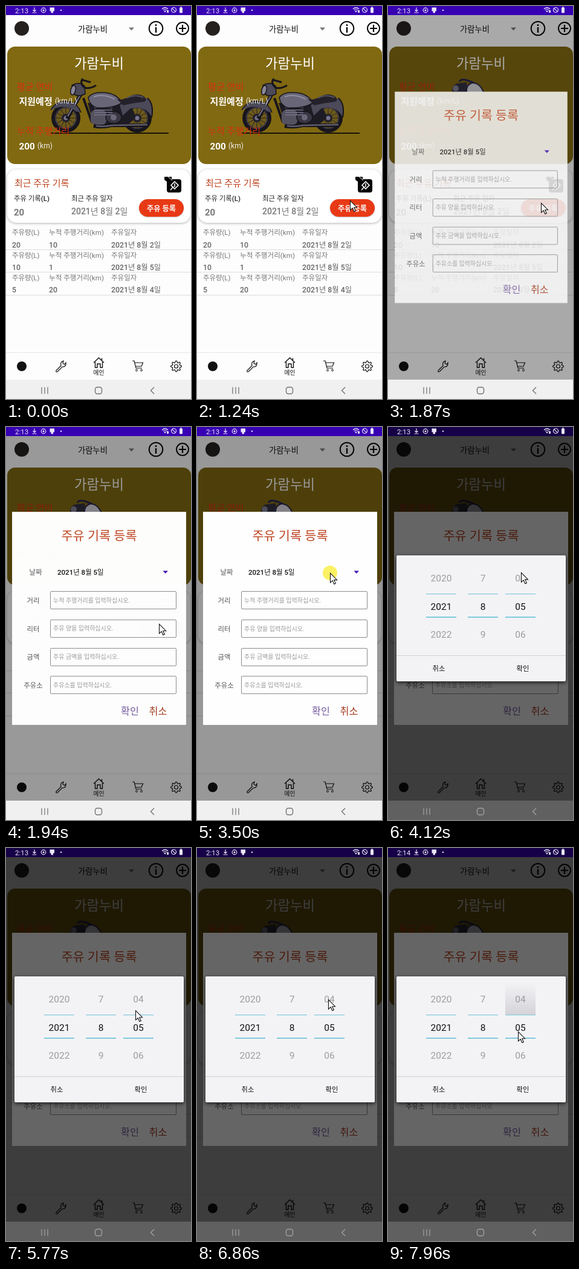
Animation, 306 px wide and 649 px high, one loop 8000 ms. Source, as an HTML page with a canvas:

```html
<!DOCTYPE html>
<html lang="ko">
<head>
<meta charset="utf-8">
<title>주유 기록</title>
<style>
html, body { margin: 0; width: 100%; height: 100%; overflow: hidden; background: #fdfdfd; }
canvas { display: block; width: 306px; height: 649px; }
</style>
</head>
<body>
<canvas id="stage"></canvas>
<script>
const W = 306, H = 649, LOOP = 8000;
const BIKE_NAME = '가람누비';
const FONT = 'Roboto, "Noto Sans CJK KR", "Noto Sans CJK", sans-serif';
const canvas = document.getElementById('stage');
const c = canvas.getContext('2d');
const dpr = window.devicePixelRatio || 1;
canvas.width = W * dpr;
canvas.height = H * dpr;

const clamp = v => Math.max(0, Math.min(1, v));
const ease = v => { v = clamp(v); return v * v * (3 - 2 * v); };
const ramp = (t, from, to) => ease((t - from) / (to - from));

function text(s, x, y, size, color, weight = 400, align = 'left') {
  c.font = `${weight} ${size}px ${FONT}`;
  c.textAlign = align;
  c.fillStyle = color;
  c.fillText(s, x, y + size * 0.37);
}
function rect(x, y, w, h, color) {
  c.fillStyle = color;
  c.fillRect(x, y, w, h);
}
function round(x, y, w, h, r, color) {
  c.beginPath();
  c.roundRect(x, y, w, h, r);
  c.fillStyle = color;
  c.fill();
}
function disc(x, y, r, color) {
  c.beginPath();
  c.arc(x, y, r, 0, 7);
  c.fillStyle = color;
  c.fill();
}
function ring(x, y, r, color, lw) {
  c.beginPath();
  c.arc(x, y, r, 0, 7);
  stroke(color, lw);
}
function stroke(color, lw) {
  c.strokeStyle = color;
  c.lineWidth = lw;
  c.stroke();
}
function path(d, color, lw) {
  const p = new Path2D(d);
  if (lw) {
    c.strokeStyle = color;
    c.lineWidth = lw;
    c.stroke(p);
  } else {
    c.fillStyle = color;
    c.fill(p);
  }
}
function shadow(color, blur, dy, draw) {
  c.save();
  c.shadowColor = color;
  c.shadowBlur = blur * dpr;
  c.shadowOffsetY = dy * dpr;
  draw();
  c.restore();
}

function wheel(x, y) {
  disc(x, y, 24, '#17151c');
  disc(x, y, 17.5, '#6d5a19');
  ring(x, y, 17, '#3c3846', 2);
  for (let i = 0; i < 12; i++) {
    const a = i * Math.PI / 6;
    c.beginPath();
    c.moveTo(x, y);
    c.lineTo(x + 17 * Math.cos(a), y + 17 * Math.sin(a));
    stroke('#24212a', 1);
  }
  disc(x, y, 7, '#24212c');
  disc(x, y, 3.5, '#77738a');
}

function bike() {
  rect(74, 209, 195, 2, '#17130a');
  wheel(99, 185);
  wheel(217, 185);
  path('M127 140 L101 186', '#17151c', 6);
  path('M126 142 L102 182', '#77738a', 2);
  path('M74 172 Q84 154 106 158 Q120 163 124 176 L116 174 Q98 160 74 172Z', '#4c4959');
  path('M74 172 Q84 154 106 158 Q120 163 124 176', '#17151c', 1.5);
  path('M135 160 L146 198 L200 198 L214 184 L206 160Z', '#1d1b24');
  path('M128 152 L142 192', '#17151c', 4);
  // rear fender
  path('M188 163 L234 152 Q245 162 241 184 Q232 164 206 169 L193 181Z', '#4c4959');
  path('M234 152 Q245 162 241 184', '#17151c', 2);
  // engine and exhaust
  round(140, 172, 26, 24, 7, '#555260');
  c.beginPath();
  c.ellipse(178, 184, 13, 10, 0, 0, 7);
  c.fillStyle = '#3a3744';
  c.fill();
  stroke('#17151c', 1.5);
  disc(178, 184, 5, '#6b6778');
  for (let i = 0; i < 4; i++) rect(146, 167 + i * 4, 30, 1.5, '#77738a');
  path('M145 198 Q158 201 174 197 L236 197', '#17151c', 6);
  path('M149 198 Q160 200 176 197 L234 196', '#615d6d', 2.5);
  // tank and seat
  path('M136 151 Q143 141 164 143 Q184 145 192 160 Q176 170 150 168 Q138 164 136 151Z', '#696678');
  path('M136 151 Q143 141 164 143 Q184 145 192 160 Q176 170 150 168 Q138 164 136 151Z', '#17151c', 1.5);
  path('M145 150 Q162 144 180 154', '#918da2', 2);
  path('M183 153 Q190 157 203 150 Q218 142 229 150 Q234 155 229 158 Q210 160 194 164Z', '#24212b');
  path('M200 152 Q214 145 227 151', '#565263', 2);
  // headlight and handlebar
  path('M109 131 Q121 124 130 132 L131 145 Q121 151 113 146Z', '#4c4959');
  path('M109 131 Q121 124 130 132 L131 145 Q121 151 113 146Z', '#17151c', 1.5);
  c.beginPath();
  c.ellipse(111, 139, 4, 8, 0.25, 0, 7);
  c.fillStyle = '#8b879b';
  c.fill();
  stroke('#17151c', 1.5);
  path('M127 120 Q121 127 130 135 Q140 137 149 131', '#17151c', 3);
  path('M126 122 L140 126', '#17151c', 3);
}

// Enlarged top of the bike, visible above the form.
function bikeTop() {
  path('M106 142 Q105 132 113 128 L130 126 L132 142Z', '#32303f');
  disc(112, 136, 5, '#7f7d90');
  path('M118 125 Q121 119 132 123 L142 127', '#292651', 3);
  path('M130 142 Q129 130 139 127 Q151 126 158 142Z', '#d9d7df');
  path('M130 142 Q129 130 139 127 Q151 126 158 142', '#292651', 2);
}

function statusIcons(late) {
  const col = '#ebe6fb';
  text(late ? '2:14' : '2:13', 15, 7.5, 11.5, col);
  path('M47 2.5 V9 M44.5 6.5 L47 9 L49.5 6.5 M43.5 11 H50.5', col, 1.2);
  ring(62, 7, 3.8, col, 1.2);
  disc(62, 7, 1.6, col);
  rect(72.5, 2.5, 7.5, 6, col);
  rect(74.5, 8, 3.5, 3.5, col);
  disc(91, 7, 1.2, col);
  path('M258 5 Q263 0.5 268 5 M260 7 Q263 4.5 266 7', col, 1.2);
  disc(263, 9, 1.3, col);
  rect(266, 7, 3, 4, col);
  ring(277.5, 6.5, 4, col, 1.2);
  path('M274.8 3.8 L280.2 9.2', col, 1.2);
  round(287, 2.5, 5, 9, 1, col);
  rect(288.3, 1.3, 2.4, 1.5, col);
}

function systemNav(dim) {
  const g = Math.round(115 + 45 * dim);
  const col = `rgb(${g},${g},${g})`;
  for (const x of [59, 64, 69]) path(`M${x} 629.5 V640.5`, col, 1.3);
  c.beginPath();
  c.roundRect(147.5, 629.5, 11, 11, 3.5);
  stroke(col, 1.4);
  path('M245 629.5 L239.5 635 L245 640.5', col, 1.4);
}

function header() {
  disc(26, 37, 12, '#25211f');
  text(BIKE_NAME, 119, 38, 13.3, '#111');
  path('M203 35.5 H212 L207.5 40.5Z', '#777');
  ring(248, 37, 11.3, '#080808', 2);
  disc(248, 31.5, 1.5, '#080808');
  rect(246.8, 35, 2.4, 9, '#080808');
  ring(292, 37, 10, '#080808', 2);
  path('M286 37 H298 M292 31 V43', '#080808', 2.2);
}

function bikeCard(zoomed) {
  round(2, 67, 304, 194, 13, '#816911');
  zoomed ? bikeTop() : bike();
  text(BIKE_NAME, 154, 95, 22.3, '#fff', 400, 'center');
  text('평균 연비', 18, 133, 15.1, '#d72f10', 500);
  text('지원예정', 21.5, 157, 15, '#fff', 700);
  text('(km/L)', 81, 157, 12, '#eee');
  text('누적 주행거리', 18, 206, 15.1, '#d72f10', 500);
  text('200', 21.5, 231, 15.3, '#fff', 700);
  text('(km)', 52, 231, 12, '#eee');
}

function pumpIcon() {
  path('M262 282 H274 V286 H286 Q290 286 290 290 V304 Q290 308 286 308 H270 Q266 308 266 304 V290 L262 287Z', '#050505');
  path('M267 281 L275 288', '#fdfdfd', 1);
  path('M279 290 L285 296 L279 302 L273 296Z', '#fdfdfd', 1.6);
  path('M277 298 L272 304 M279 293 V299', '#fdfdfd', 1.5);
}

function fuelCard() {
  shadow('rgba(0,0,0,.3)', 4, 1, () => round(2, 270, 303, 88, 15, '#fff'));
  text('최근 주유 기록', 14, 292, 15, '#bd431f', 500);
  text('주유 기록(L)', 13, 318, 11.4, '#222', 500);
  text('최근 주유 일자', 108, 318, 11.4, '#222', 500);
  text('20', 13, 340, 15, '#777', 700);
  text('2021년 8월 2일', 108, 339, 14, '#777', 500);
  pumpIcon();
  shadow('rgba(0,0,0,.25)', 2, 1, () => round(220, 319, 74, 29, 14.5, '#e83916'));
  text('주유 등록', 257, 334, 12.2, '#fff', 700, 'center');
}

function fuelList() {
  const rows = [['20', '10', 2], ['10', '1', 5], ['5', '20', 4]];
  rows.forEach(([litres, km, day], i) => {
    const y = 374 + i * 37.3;
    text('주유량(L)', 10, y, 11.4, '#777');
    text('누적 주행거리(km)', 71, y, 11.6, '#777');
    text('주유일자', 174, y, 11.5, '#777');
    text(litres, 10, y + 20, 12.3, '#666', 500);
    text(km, 71, y + 20, 12.3, '#666', 500);
    text(`2021년 8월 ${day}일`, 174, y + 20, 12.3, '#666', 500);
    rect(0, Math.round(y + 28), W, 1, '#dcdcdc');
  });
}

function tabs() {
  const col = '#111';
  rect(0, 572, W, 1, '#e6e6e6');
  disc(26, 595, 8, col);
  path('M83 602 L91 594 Q89 588 95 586 L94 590 L97 592 L99 589 Q100 596 93 596 L85 604 Q82 605 83 602Z', col, 1.2);
  path('M145 589 L153.5 581 L162 589 M147.5 588 V597 H151 V591 H156 V597 H159.5 V588 M158.5 585 V581.5', col, 1.4);
  text('메인', 153.5, 605, 9.8, '#111', 500, 'center');
  path('M209 586 H212 L215 598 H225 M213 589 H226.5 L224 595 H214.5', col, 1.2);
  ring(216, 601.5, 1.5, col, 1);
  ring(224, 601.5, 1.5, col, 1);
  c.beginPath();
  for (let i = 0; i <= 64; i++) {
    const a = i / 64 * Math.PI * 2;
    const r = 7.6 + 1.2 * Math.tanh(3 * Math.cos(8 * a));
    c.lineTo(281.5 + r * Math.cos(a), 595 + r * Math.sin(a));
  }
  stroke(col, 1.2);
  ring(281.5, 595, 3, col, 1.2);
}

function form(p) {
  c.save();
  c.globalAlpha = p;
  const s = 0.95 + 0.05 * p;
  c.translate(154, 316);
  c.scale(s, s);
  c.translate(-154, -316);
  rect(10, 140, 288, 352, '#fefefe');
  text('주유 기록 등록', 154, 179, 20.8, '#bd431f', 500, 'center');
  text('날짜', 49, 240, 11.4, '#555', 500, 'center');
  text('2021년 8월 5일', 85, 240, 11.5, '#111', 500);
  path('M259.5 237.5 H268 L263.7 242Z', '#3d12b5');
  const fields = [
    ['거리', '누적 주행거리를 입력하십시오.'],
    ['리터', '주유 양을 입력하십시오.'],
    ['금액', '주유 금액을 입력하십시오.'],
    ['주유소', '주유소를 입력하십시오.']
  ];
  fields.forEach(([label, hint], i) => {
    const y = 271.5 + i * 46.8;
    text(label, 45, y + 15, 11.4, '#555', 500, 'center');
    c.beginPath();
    c.roundRect(73.5, Math.floor(y) + 0.5, 208, 29, 1.5);
    stroke('#8c8c8c', 1);
    text(hint, 78, y + 14.5, 10, '#999');
  });
  text('확인', 205, 469, 16.2, '#73599e', 400, 'center');
  text('취소', 251.5, 469, 16.2, '#a33a1d', 400, 'center');
  c.restore();
}

function picker(p, pressed) {
  c.save();
  c.globalAlpha = p;
  const s = 0.95 + 0.05 * p;
  c.translate(154, 316);
  c.scale(s, s);
  c.translate(-154, -316);
  shadow('rgba(0,0,0,.75)', 6, 2, () => round(14, 212, 280, 208, 2, '#f3f3f6'));
  if (pressed) {
    const g = c.createLinearGradient(0, 222, 0, 275);
    g.addColorStop(0, '#f3f3f6');
    g.addColorStop(1, '#d5d3d7');
    rect(194, 222, 50, 53, g);
  }
  const columns = [[88, ['2020', '2021', '2022']], [157, ['7', '8', '9']], [219, ['04', '05', '06']]];
  for (const [x, values] of columns) {
    values.forEach((v, i) => text(v, x, 249 + i * 46.8, 15.5, i === 1 ? '#111' : '#9c9c9e', 400, 'center'));
    rect(x - 25, 275, 50, 1.3, '#8acbdc');
    rect(x - 25, 313.3, 50, 1.6, '#66c0d8');
  }
  rect(14, 377, 280, 1, '#d0d0d2');
  text('취소', 84, 399, 11.3, '#111', 500, 'center');
  text('확인', 223, 399, 11.3, '#111', 500, 'center');
  c.restore();
}

// time, x, y of the pointer tip
const route = [
  [760, 296, 622], [1080, 264, 310], [1240, 253, 321], [1390, 253, 325],
  [2330, 253, 325], [3190, 220, 243], [3350, 220, 241], [4430, 220, 240],
  [4750, 220, 241], [5300, 216, 262], [5690, 214, 268], [6080, 214, 268],
  [6470, 217, 250], [7410, 217, 250], [7880, 215, 303], [8000, 215, 303]
];

function pointerAt(t) {
  const i = route.findIndex(k => k[0] > t);
  const [t0, x0, y0] = route[i - 1], [t1, x1, y1] = route[i];
  const e = ease((t - t0) / (t1 - t0));
  return [x0 + (x1 - x0) * e, y0 + (y1 - y0) * e];
}

function pointer(t) {
  if (t < route[0][0]) return;
  const [x, y] = pointerAt(t);
  const click = (t >= 1390 && t < 1470) || (t >= 3500 && t < 3620);
  if (click) disc(x, y, 12, 'rgba(250,238,60,.8)');
  c.save();
  c.translate(x + 0.5, y + 0.5);
  const arrow = 'M0 0 V15.5 L3.7 12.2 L6.3 18 L8.8 16.9 L6.2 11.2 H11Z';
  path(arrow, '#fff');
  path(arrow, '#111', 1.1);
  c.restore();
}

function draw(t) {
  c.setTransform(dpr, 0, 0, dpr, 0, 0);
  const open = ramp(t, 1620, 1960);
  const pick = ramp(t, 3640, 4060);
  rect(0, 0, W, H, '#fdfdfd');
  header();
  bikeCard(t >= 1620);
  fuelCard();
  fuelList();
  tabs();
  rect(0, 15, W, 602, `rgba(0,0,0,${0.4 * open})`);
  rect(0, 0, W, 15, '#3700b3');
  rect(0, 617, W, 32, '#f0f0f0');
  if (open) form(open);
  rect(0, 0, W, H, `rgba(0,0,0,${0.6 * pick})`);
  statusIcons(t >= 7330);
  systemNav(pick);
  if (pick) picker(pick, t >= 7560);
  pointer(t);
}

const start = performance.now();
function tick() {
  draw((performance.now() - start) % LOOP);
  requestAnimationFrame(tick);
}
tick();
</script>
</body>
</html>
```
